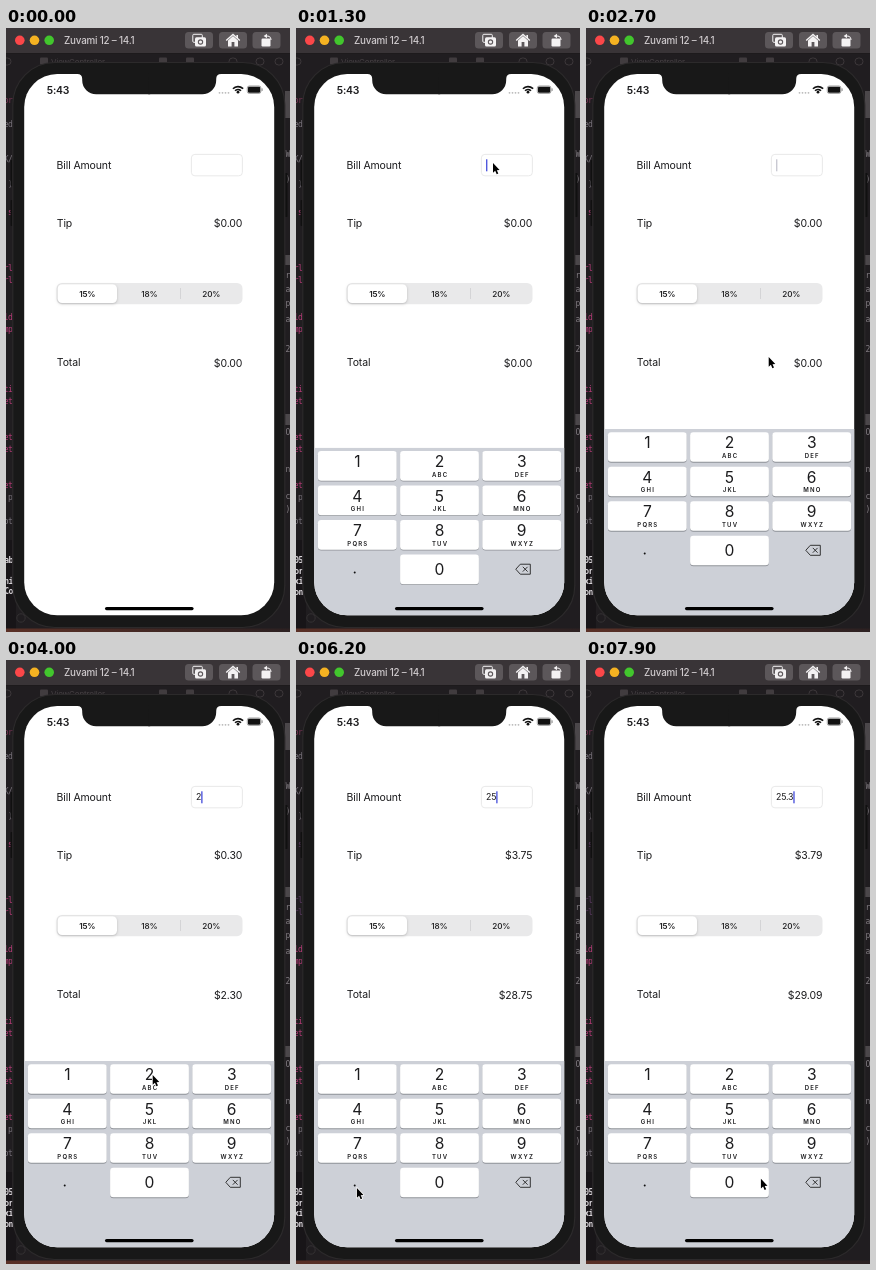
An HTML page with a canvas for the animation above (8000 ms loop, 284 by 604 pixels).

```html
<!DOCTYPE html>
<html lang="en">
<head>
<meta charset="utf-8">
<title>Tip calculator</title>
<style>
html, body { margin: 0; width: 100%; height: 100%; overflow: hidden; background: #1d1a1c; }
canvas { display: block; width: 284px; height: 604px; }
</style>
</head>
<body>
<canvas id="stage"></canvas>
<script>
const W = 284, H = 604, LOOP = 8000;
const canvas = document.getElementById('stage');
const ctx = canvas.getContext('2d');
const dpr = window.devicePixelRatio || 1;
canvas.width = W * dpr;
canvas.height = H * dpr;

const SANS = 'Inter, "Liberation Sans", sans-serif';
const MONO = '"DejaVu Sans Mono", monospace';
const BEZEL = '#181818';
const SCREEN = [18.2, 46, 250, 541.2, 33];

// Typed values: [time, field text, tip, total]
const entries = [
  [0, '', '$0.00', '$0.00'],
  [3.9, '2', '$0.30', '$2.30'],
  [5, '25', '$3.75', '$28.75'],
  [6.7, '25.', '$3.75', '$28.75'],
  [7.4, '25.3', '$3.79', '$29.09']
];
const FOCUS = 1;
const presses = [[3.8, 3.95, '2'], [4.8, 5.1, '5'], [7.3, 7.5, '3']];

// Pointer stops: [time, x, y]
const stops = [
  [0.3, -9, 56], [0.9, 196.3, 134.3], [1.9, 196.3, 134.3], [2.4, 174, 376],
  [2.7, 182, 328.3], [2.8, 182, 328.3], [3.7, 146, 414.3], [4.1, 146, 414.3],
  [4.8, 143, 451], [5.4, 143, 451], [6.2, 60.2, 527.3], [6.7, 60.2, 527.3],
  [7.2, 225, 413], [7.4, 225, 413], [7.9, 174.2, 518]
];

const letters = ['', 'ABC', 'DEF', 'GHI', 'JKL', 'MNO', 'PQRS', 'TUV', 'WXYZ'];

function box(x, y, w, h, r, fill, stroke) {
  ctx.beginPath();
  ctx.roundRect(x, y, w, h, r);
  if (fill) { ctx.fillStyle = fill; ctx.fill(); }
  if (stroke) { ctx.strokeStyle = stroke; ctx.stroke(); }
}

function disc(x, y, r, fill) {
  ctx.beginPath();
  ctx.arc(x, y, r, 0, Math.PI * 2);
  ctx.fillStyle = fill;
  ctx.fill();
}

function text(str, x, y, size, { color = '#1c1c1e', weight = 400, align = 'left', gap = -0.13, font = SANS } = {}) {
  ctx.font = `${weight} ${size}px ${font}`;
  ctx.letterSpacing = gap + 'px';
  ctx.textAlign = align;
  ctx.fillStyle = color;
  ctx.fillText(str, x, y);
}

function line(points, color, width = 1, close = false) {
  ctx.beginPath();
  points.forEach(([x, y]) => ctx.lineTo(x, y));
  if (close) ctx.closePath();
  ctx.strokeStyle = color;
  ctx.lineWidth = width;
  ctx.stroke();
}

function shape(points, fill) {
  ctx.beginPath();
  points.forEach(([x, y]) => ctx.lineTo(x, y));
  ctx.closePath();
  ctx.fillStyle = fill;
  ctx.fill();
}

function drawEditor(t) {
  ctx.fillStyle = '#201d20';
  ctx.fillRect(0, 0, W, H);
  ctx.fillStyle = '#181518';
  ctx.fillRect(0, 512, 10, 92);
  const edge = ctx.createLinearGradient(0, 0, W, 0);
  edge.addColorStop(0, '#5a3026');
  edge.addColorStop(1, '#2c2021');
  ctx.fillStyle = edge;
  ctx.fillRect(0, 600.5, W, 4);

  text('ViewController', 45, 37, 8, { color: '#454043' });
  ctx.lineWidth = 1;
  for (const x of [-3, 223, 250, 269]) box(x, 30, 8, 7, 3.5, null, '#3d383b');
  for (const x of [34, 153, 180]) box(x, 29.5, 8, 7, 1, '#413c3f');

  const pink = '#b83c78', grey = '#77727a';
  const faded = t >= 4.6 ? '#5b3a62' : pink;
  const code = [
    [75, 'or', '#7b3555'], [99, 'ed', grey], [134, 'K/', grey], [159, ')', grey],
    [187, 's', faded], [243, 'rl', faded], [255, 'rl', faded], [292, 'ld', pink],
    [304, 'mp', pink], [364, 'ti', pink], [376, 'et', pink], [412, 'et', pink],
    [424, 'et', pink], [460, 'et', pink], [472, 'p', grey], [496, 'ot', grey]
  ];
  for (const [y, s, color] of code) text(s, 6.5, y, 8, { color, align: 'right', font: MONO, gap: -0.4 });

  const log = t < 0.5 ? [[535, 'ab'], [556, 'ni'], [566, 'Co']]
    : [[535, '05'], [546, 'or'], [556, 'xi'], [567, 'on']];
  for (const [y, s] of log) {
    text(s, 7, y, 8, { color: '#d8d4d8', weight: 700, align: 'right', font: MONO, gap: -0.4 });
  }

  ctx.fillStyle = '#4b474a';
  for (const [y, h] of [[63, 27], [227, 10], [386, 11]]) ctx.fillRect(279, y, 5, h);
  [[129, 'W'], [154, ')'], [250, 'r'], [264, 'a'], [278, 'p'], [294, 'a'], [324, '2'],
    [407, 'O'], [444, 'n'], [471, 'c'], [484, ')']]
    .forEach(([y, s]) => text(s, 279.5, y, 8, { color: '#827d82', font: MONO }));
}

function drawTitleBar() {
  ctx.fillStyle = '#393437';
  ctx.fillRect(0, 0, W, 25);
  ctx.fillStyle = '#1d1a1c';
  ctx.fillRect(0, 25, W, 1);
  ['#fc4749', '#f5b222', '#42c62d'].forEach((c, i) => disc(13.8 + i * 14.7, 12.3, 4.8, c));
  text('Zuvami 12 – 14.1', 58, 16, 9.8, { color: '#d0cbce', weight: 500, gap: -0.2 });
  for (const x of [179, 213, 246.5]) box(x, 4, 28, 16.5, 3.5, '#5c575a');

  const ink = '#f4f2f3';
  ctx.lineWidth = 1;
  box(186.8, 6.3, 9.5, 8, 1, null, ink);
  box(189, 9.3, 11, 9.2, 1.5, ink);
  disc(194.5, 14, 2.7, '#5c575a');
  disc(194.5, 14, 1.6, ink);

  line([[220.2, 12.6], [227, 6.4], [233.8, 12.6]], ink, 1.4);
  shape([[222, 12.5], [227, 8], [232, 12.5], [232, 18.4], [228.4, 18.4], [228.4, 14],
    [225.6, 14], [225.6, 18.4], [222, 18.4]], ink);
  ctx.fillStyle = ink;
  ctx.fillRect(230.4, 7, 1.6, 3);

  box(255.5, 10.5, 9, 8, 1.2, ink);
  ctx.beginPath();
  ctx.arc(261, 12, 4, -Math.PI / 2, 0);
  ctx.strokeStyle = ink;
  ctx.lineWidth = 1.1;
  ctx.stroke();
  shape([[261, 5.7], [261, 10.3], [257.6, 8]], ink);
}

function drawPhone() {
  box(4.5, 132, 4, 26, 1, '#101010');
  box(4.5, 172, 4, 26, 1, '#101010');
  box(277.5, 145, 4, 44, 1, '#101010');
  ctx.lineWidth = 1.2;
  box(6.8, 34.5, 272, 565, 42, BEZEL, '#2c2a2b');
  ctx.lineWidth = 1;
  box(10.8, 585.8, 8.4, 8.4, 4.2, null, '#343133');
  box(...SCREEN, '#fff');
}

function drawNotch() {
  const mid = SCREEN[0] + SCREEN[2] / 2, top = SCREEN[1], bottom = 66.3, half = 67;
  ctx.fillStyle = BEZEL;
  for (const side of [-1, 1]) {
    const wall = mid + side * half;
    ctx.beginPath();
    ctx.moveTo(mid - side, top - 1);
    ctx.lineTo(wall + side * 5, top - 1);
    ctx.lineTo(wall + side * 5, top);
    ctx.quadraticCurveTo(wall, top, wall, top + 5);
    ctx.arcTo(wall, bottom, mid, bottom, 14);
    ctx.lineTo(mid - side, bottom);
    ctx.fill();
  }
}

function drawStatus() {
  text('5:43', 40.8, 65.5, 10.4, { weight: 600, gap: -0.2 });
  for (let i = 0; i < 4; i++) disc(213.5 + i * 3, 64.8, 0.9, '#b9b9b9');
  ctx.strokeStyle = '#111';
  ctx.lineWidth = 1.7;
  for (const r of [4, 6.9]) {
    ctx.beginPath();
    ctx.arc(232, 65.5, r, -Math.PI * 0.76, -Math.PI * 0.24);
    ctx.stroke();
  }
  disc(232, 64.2, 1.4, '#111');
  ctx.lineWidth = 0.7;
  box(241.3, 58, 13.6, 7.4, 2, null, '#777');
  box(242, 58.7, 12.2, 6, 1.3, '#111');
  box(255.6, 60.3, 1, 2.8, 0.5, '#888');
}

function drawForm(t) {
  const [since, value, tip, total] = entries.filter(e => e[0] <= t).pop();
  const right = { align: 'right' };
  text('Bill Amount', 50.6, 141.2, 10.5);
  text('Tip', 50.8, 199.4, 10.5);
  text('Total', 50.8, 337.5, 10.5);
  text(tip, 236.3, 199.4, 10.5, right);
  text(total, 236.3, 339.4, 10.5, right);

  ctx.lineWidth = 0.8;
  box(185.4, 126.4, 51, 21.4, 3.5, '#fff', '#e4e4e4');
  text(value, 190, 140.3, 8.8, { gap: -0.2 });
  if (t >= FOCUS) {
    const x = 190 + (value ? ctx.measureText(value).width : 0);
    const lit = (t - Math.max(since, FOCUS)) % 1 < 0.52;
    ctx.fillStyle = lit ? '#5159dd' : '#c9c9d2';
    ctx.fillRect(x, 131.3, 1.4, 12);
  }

  box(50.5, 255, 186, 21.2, 5.5, '#e9e9ea');
  ctx.save();
  ctx.shadowColor = 'rgba(0,0,0,.2)';
  ctx.shadowBlur = 3 * dpr;
  ctx.shadowOffsetY = dpr;
  box(51.6, 256.2, 59.4, 18.8, 4.5, '#fff');
  ctx.restore();
  ctx.fillStyle = '#cfcfd1';
  ctx.fillRect(174, 260, 0.8, 11);
  ['15%', '18%', '20%'].forEach((s, i) =>
    text(s, 81.3 + i * 62, 268.7, 8.2, { align: 'center', weight: i ? 500 : 600, gap: -0.2 }));
}

function drawKey(label, sub, x, y, down) {
  box(x, y + 0.9, 78.8, 29.6, 3.3, '#8f9298');
  box(x, y, 78.8, 29.6, 3.3, down ? '#b3b7c0' : '#fff');
  text(label, x + 39.4, y + (label === '0' ? 20.6 : 16.2), 15.6, { align: 'center', gap: 0 });
  if (sub) text(sub, x + 40, y + 25.6, 6, { align: 'center', weight: 600, gap: 1.2 });
}

function drawKeyboard(t) {
  const s = (t - 1.072) * 17;
  if (s < 0) return;
  const drop = 187 * (1 + s) * Math.exp(-s);
  ctx.save();
  ctx.beginPath();
  ctx.roundRect(...SCREEN);
  ctx.clip();
  ctx.translate(0, drop);
  ctx.fillStyle = '#cdd0d7';
  ctx.fillRect(18, 401, 251, 190);
  const pressed = presses.filter(p => t >= p[0] && t < p[1]).map(p => p[2]);
  const column = i => 21.9 + i * 82.2;
  letters.forEach((sub, i) => {
    const label = String(i + 1);
    drawKey(label, sub, column(i % 3), 404.2 + Math.floor(i / 3) * 34.5, pressed.includes(label));
  });
  drawKey('0', '', column(1), 507.7, false);
  disc(58.7, 525.6, 1, '#111');
  line([[219.8, 522.3], [224.3, 517.3], [234.3, 517.3], [234.3, 527.3], [224.3, 527.3]], '#222', 0.9, true);
  line([[226.8, 519.9], [231.6, 524.7]], '#222', 0.9);
  line([[231.6, 519.9], [226.8, 524.7]], '#222', 0.9);
  ctx.restore();
}

function drawPointer(t) {
  if (t < stops[0][0]) return;
  const n = stops.findIndex(p => p[0] > t);
  const b = n < 0 ? stops[stops.length - 1] : stops[n];
  const a = n < 0 ? b : stops[n - 1];
  const u = n < 0 ? 0 : (t - a[0]) / (b[0] - a[0]);
  const k = u * u * (3 - 2 * u);
  const arrow = [[0.7, 0.8], [0.7, 10.4], [2.9, 8.5], [4.4, 12], [6, 11.3], [4.5, 7.9], [7.3, 7.7]];
  ctx.save();
  ctx.translate(a[1] + (b[1] - a[1]) * k, a[2] + (b[2] - a[2]) * k);
  ctx.lineJoin = 'round';
  line(arrow, '#fff', 1.5, true);
  shape(arrow, '#000');
  ctx.restore();
}

function frame(now) {
  const t = Math.floor((now % LOOP) / 100) / 10;
  ctx.setTransform(dpr, 0, 0, dpr, 0, 0);
  drawEditor(t);
  drawTitleBar();
  drawPhone();
  drawNotch();
  drawStatus();
  drawForm(t);
  drawKeyboard(t);
  box(99, 579, 88.6, 3.2, 1.6, '#000');
  drawPointer(t);
}

const start = performance.now();
function loop() {
  frame(performance.now() - start);
  requestAnimationFrame(loop);
}
loop();
</script>
</body>
</html>
```
